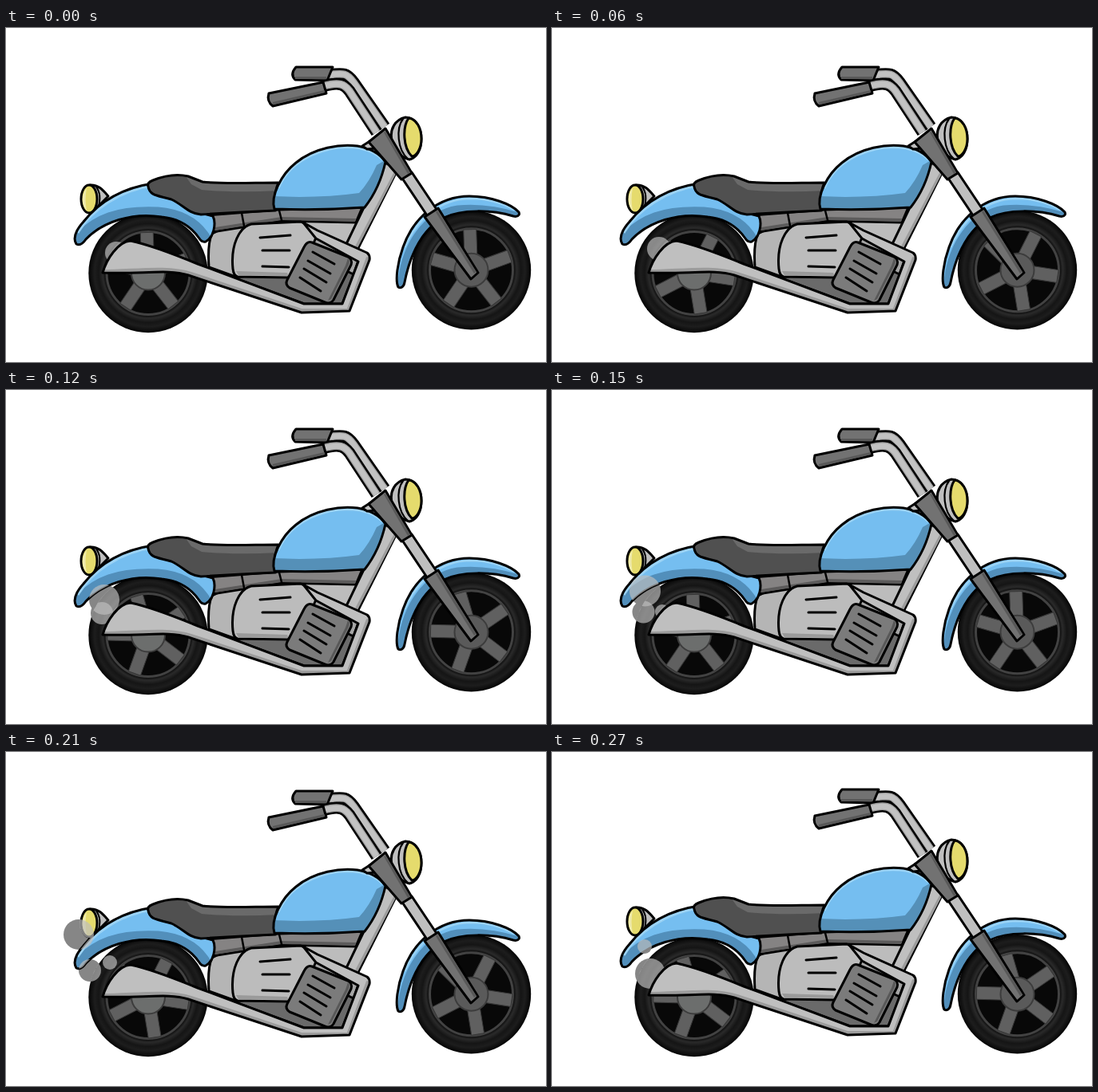
Recreate the animation shown at these times as an HTML page. Size 676x419 px, loop 0.3 s.

```html
<!DOCTYPE html>
<html lang="en">
<head>
<meta charset="utf-8">
<title>Motorcycle</title>
<style>
html, body { margin: 0; width: 100%; height: 100%; overflow: hidden; background: #fff; }
svg { display: block; width: 100vw; height: 100vh; }
.ink { stroke: #000; stroke-width: 3; stroke-linejoin: round; stroke-linecap: round; }
.line { fill: none; }
.chrome { fill: #bfbfbf; }
.dark { fill: #727272; }
.shade { fill: #585858; }
</style>
</head>
<body>
<svg viewBox="0 0 676 419" preserveAspectRatio="none">
  <defs>
    <path id="rearFender" d="M88 271C83 263 89 252 97 243C116 219 143 201 184 195L240 231L259 236C263 244 261 262 250 268Q245 269 242 264C231 248 215 239 195 237C158 231 121 243 100 265Q94 274 88 271Z"/>
    <path id="frontFender" d="M491 325C487 317 490 294 497 275C510 238 541 211 580 211C607 211 633 221 642 231C644 236 639 237 635 236C609 228 570 227 548 238C522 251 506 283 499 319C498 325 494 327 491 325Z"/>
    <path id="tank" d="M336 227C331 211 344 184 363 169C386 150 419 145 440 148C457 151 469 159 475 168C470 191 460 211 449 225Q394 229 336 227Z"/>
    <path id="seat" d="M178 199Q176 194 184 191C199 185 215 183 228 186L246 193C270 196 309 194 341 194Q334 210 337 229Q290 231 244 234C229 233 222 222 207 215C191 210 180 211 178 199Z"/>
    <path id="pipe" d="M121 307C126 290 140 268 156 267C180 272 211 284 240 296L373 346H421L441 293L388 264L372 244L390 254L452 282Q456 285 455 291L430 355L370 357L228 310C204 302 170 309 121 307Z"/>
    <path id="lens" d="M504 113C514 114 520 126 520 139C520 151 514 161 508 161C497 150 496 125 504 113Z"/>
    <clipPath id="cRear"><use href="#rearFender"/></clipPath>
    <clipPath id="cFront"><use href="#frontFender"/></clipPath>
    <clipPath id="cTank"><use href="#tank"/></clipPath>
    <clipPath id="cSeat"><use href="#seat"/></clipPath>
    <clipPath id="cPipe"><use href="#pipe"/></clipPath>
    <clipPath id="cBike">
      <use href="#rearFender"/><circle cx="178" cy="307.5" r="75"/>
      <ellipse cx="104" cy="214" rx="12" ry="19"/><circle cx="117" cy="212" r="10"/>
    </clipPath>
    <radialGradient id="tyre">
      <stop offset=".7" stop-color="#050505"/><stop offset=".76" stop-color="#2a2a2a"/>
      <stop offset=".83" stop-color="#151515"/><stop offset=".9" stop-color="#1d1d1d"/>
      <stop offset="1" stop-color="#050505"/>
    </radialGradient>
    <g id="tyreShape">
      <circle r="74.7" fill="url(#tyre)"/>
      <circle r="52" fill="#080808" stroke="#424242" stroke-width="3"/>
    </g>
  </defs>

  <g id="smokeBack" fill="#868686"></g>
  <g id="wheels"></g>

  <g class="body">
    <!-- tail lamp -->
    <path class="ink chrome" d="M105 197C116 196 122 204 128 211L115 224L105 232Z"/>
    <path class="ink line" d="M112 198Q121 209 115 226" style="stroke-width:2"/>
    <ellipse class="ink" cx="104" cy="214.5" rx="10" ry="17.5" fill="#e5db6d"/>
    <path d="M101 201C94 208 94 223 101 229Q98 215 101 201Z" fill="#f0ebac"/>

    <!-- frame rail and rear engine box -->
    <path fill="#bcbcbc" d="M370 238L440 240L428 275L390 262Z"/>
    <path class="ink" fill="#b5b5b5" d="M258 258Q270 250 304 247L290 313L254 300Q252 270 258 258Z"/>
    <path class="ink" fill="#858383" d="M252 235L341 228L446 225L438 244L345 242L258 256Z"/>
    <path d="M262 250L345 237L438 239L437 243L345 241L262 254Z" fill="#5c5b5b"/>
    <path class="ink line" d="M295 232L298 248M342 229L345 241" style="stroke-width:2.5"/>

    <!-- rear fender -->
    <use href="#rearFender" fill="#75bef0"/>
    <g clip-path="url(#cRear)" fill="none">
      <path d="M86 273C111 239 145 231 190 233C224 236 243 251 253 274" stroke="#528fbb" stroke-width="17"/>
      <path d="M90 257C106 229 143 203 184 198" stroke="#9bd3f5" stroke-width="3"/>
    </g>
    <use href="#rearFender" class="ink line"/>

    <!-- down tube -->
    <path class="ink chrome" d="M475 169L490 178L440 278L426 271Z"/>
    <path d="M486 180L489 181L440 276L437 274Z" fill="#9c9c9c"/>

    <use href="#seat" fill="#505050"/>
    <path clip-path="url(#cSeat)" fill="#6a6a6a" d="M222 182L250 190H345L341 204Q285 207 245 203L232 196Z"/>
    <use href="#seat" class="ink line"/>

    <use href="#tank" fill="#75bef0"/>
    <g clip-path="url(#cTank)">
      <path d="M480 163L464 172Q455 193 442 207Q392 214 332 211V230H453Z" fill="#5590b8"/>
      <path d="M341 201C357 162 405 145 443 151Q462 155 471 165" fill="none" stroke="#9bd3f5" stroke-width="3"/>
    </g>
    <use href="#tank" class="ink line"/>

    <!-- handlebars -->
    <g fill="none" stroke-linejoin="round">
      <g id="farBar"></g>
      <path class="ink dark" d="M363 49H409L402 66L362 65Q355 58 363 49Z"/>
      <path d="M362 62.5H401" stroke="#585858" stroke-width="3"/>
      <g id="nearBar"></g>
      <path class="ink dark" d="M329 82L397 68L401 82L334 98Q326 92 329 82Z"/>
      <path d="M334 94.5L399 79.5" stroke="#585858" stroke-width="3"/>
    </g>

    <!-- headlight -->
    <path class="ink chrome" d="M500 112C513 112 520 126 520 139C520 153 514 163 505 165C493 162 485 152 483 141C480 127 487 115 500 112Z"/>
    <path class="ink line" d="M497 114C488 126 490 153 503 164" style="stroke-width:2.2"/>
    <use href="#lens" class="ink" fill="#e5db6d"/>

    <!-- fork and front fender -->
    <path class="ink chrome" d="M446 148L457 141L463 151L452 152Z"/>
    <use href="#frontFender" fill="#75bef0"/>
    <g clip-path="url(#cFront)" fill="none">
      <path d="M496 328C500 270 529 235 566 229C597 226 622 232 641 238" stroke="#528fbb" stroke-width="13"/>
      <path d="M499 275C514 240 543 215 580 214Q612 214 636 228" stroke="#9bd3f5" stroke-width="2.5"/>
    </g>
    <use href="#frontFender" class="ink line"/>
    <path class="ink chrome" d="M495 187L508 181L540 229L529 238Z"/>
    <path class="ink dark" d="M454 143L475 126L508 182L495 190Z"/>
    <path class="shade" d="M473 131L475 130L506 181L503 183Z"/>
    <path class="ink dark" d="M524 237L541 226L591 307L582 315Z"/>
    <path class="shade" d="M538 231L540 229L589 306L586 308Z"/>
  </g>

  <g clip-path="url(#cBike)"><g id="smokeFront" fill="#bebebe" fill-opacity=".68"></g></g>

  <g class="body">
    <!-- engine -->
    <path class="ink" fill="#6a6a6a" d="M284 313L352 306L380 270L400 260L443 290L421 346H373Z"/>
    <path class="ink" fill="#bcbcbc" d="M284 302C281 272 292 250 307 246L369 243Q387 251 398 270L353 313L290 312Q285 311 284 302Z"/>
    <path d="M288 305L352 307L354 311L291 310Z" fill="#9a9a9a"/>
    <path class="ink line" d="M318 263L356 260M321 279H355M321 299L354 300"/>
    <path class="ink" fill="#a5a5a5" d="M388 263L441 292L435 309L380 282Z"/>
    <path class="ink" fill="#7b7b7b" d="M383 269L428 287Q434 290 432 297L410 341Q406 347 399 344L355 326Q349 322 352 316L373 275Q377 267 383 269Z"/>
    <path class="shade" d="M428 289Q431 291 429 297L407 340L403 342L425 298Z"/>
    <path class="ink line" d="M384 281L411 296M378 292L406 308M373 302L401 319M368 313L394 330"/>

    <use href="#pipe" class="chrome"/>
    <g clip-path="url(#cPipe)" fill="none" stroke="#9c9c9c">
      <path d="M121 306C160 306 201 299 232 309L370 355H429L454 288" stroke-width="6"/>
    </g>
    <use href="#pipe" class="ink line"/>
  </g>
</svg>
<script>
const NS = 'http://www.w3.org/2000/svg';
const STEP = 30, STEPS = 10, TURN = 14.4, PHASE = -20;
const $ = id => document.getElementById(id);

function add(parent, tag, attrs) {
  const el = document.createElementNS(NS, tag);
  for (const k in attrs) el.setAttribute(k, attrs[k]);
  return parent.appendChild(el);
}

function tube(id, d) {
  [['#000', 15], ['#a0a0a0', 9.6], ['#c2c2c2', 7]].forEach(([stroke, w]) =>
    add($(id), 'path', { d, stroke, 'stroke-width': w }));
}
tube('farBar', 'M402 59C424 56 427 57 435 68L474 124');
tube('nearBar', 'M397 73C418 67 424 71 430 79L464 131');

// cx, cy and hub colour
const spokes = [[178, 307.5, '#6c6e6d'], [582.5, 303.7, '#5a5a5a']].map(([x, y, hub]) => {
  const wheel = add($('wheels'), 'g', { transform: `translate(${x} ${y})` });
  add(wheel, 'use', { href: '#tyreShape' });
  const g = add(wheel, 'g', {});
  for (let i = 0; i < 5; i++)
    add(g, 'path', { d: 'M14 -8L51 -8V8L14 8Z', fill: '#606060', stroke: '#383838', transform: `rotate(${i * 72})` });
  add(wheel, 'circle', { r: 21, fill: hub, stroke: '#3c3c3c', 'stroke-width': 2 });
  return g;
});

// Each puff: keys of [step, x, y, radius]
const puffs = [
  [[0, 138, 282, 14], [2, 134, 277, 15], [4, 123, 263, 19], [6, 110, 241, 20], [7, 91, 229, 19]],
  [[3, 126, 283, 14], [4, 120, 280, 14], [6, 109, 277, 14], [7, 105, 274, 14], [8, 82, 258, 13]],
  [[5, 138, 278, 9], [6, 134, 271, 9], [7, 130, 264, 9], [8, 121, 253, 9], [9, 116, 244, 9]],
  [[8, 129, 279, 18], [9, 123, 278, 19]]
].map(keys => ({ keys, dots: ['smokeBack', 'smokeFront'].map(id => add($(id), 'circle', {})) }));

function at(keys, s) {
  const i = keys.findIndex(k => k[0] >= s);
  if (i < 0 || s < keys[0][0]) return [0, 0, 0];
  const b = keys[i], a = keys[Math.max(0, i - 1)];
  const f = a === b ? 0 : (s - a[0]) / (b[0] - a[0]);
  return [1, 2, 3].map(n => a[n] + (b[n] - a[n]) * f);
}

const bodies = document.querySelectorAll('.body');

function draw(ms) {
  const s = Math.floor(ms / STEP) % STEPS;
  const lift = s === STEPS - 1 ? -2 : 0;
  bodies.forEach(b => b.setAttribute('transform', `translate(0 ${lift})`));
  spokes.forEach(g => g.setAttribute('transform', `rotate(${PHASE + s * TURN})`));
  puffs.forEach(({ keys, dots }) => {
    const [x, y, r] = at(keys, s);
    dots.forEach(c => {
      c.setAttribute('cx', x);
      c.setAttribute('cy', y);
      c.setAttribute('r', r);
    });
  });
}

const start = performance.now();
function tick() {
  draw(performance.now() - start);
  requestAnimationFrame(tick);
}
draw(0);
requestAnimationFrame(tick);
</script>
</body>
</html>
```
